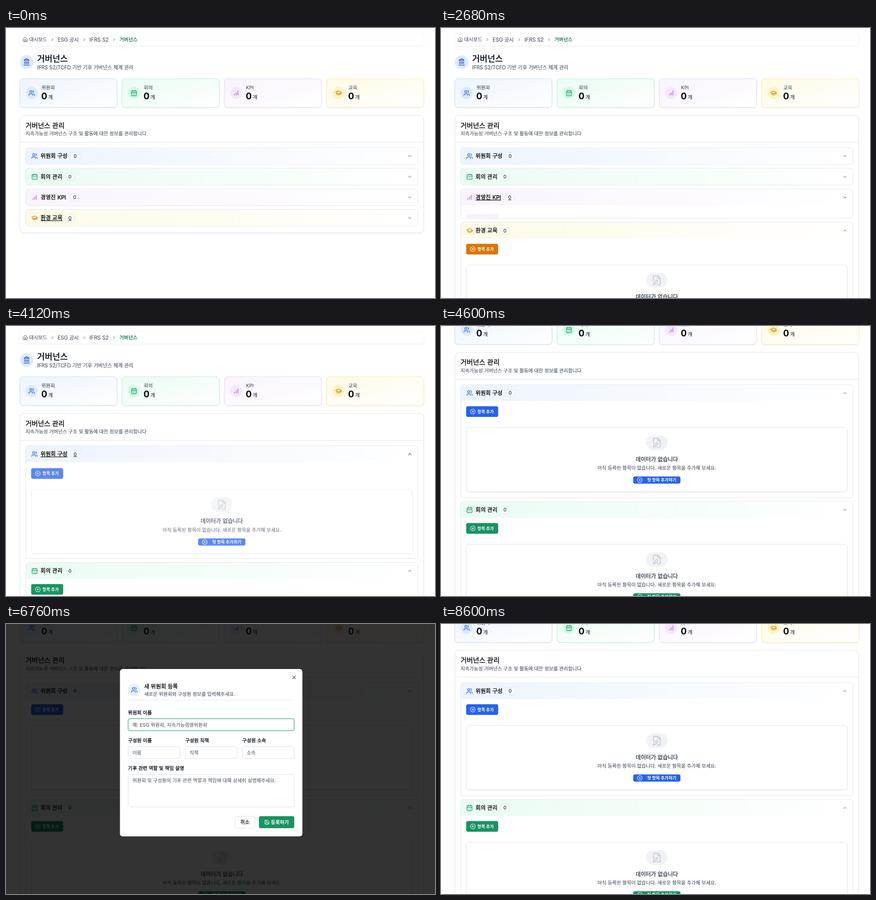
Recreate the animation shown at these times as an HTML page. Size 943 by 594 pixels, loop 8840 ms.

```html
<!DOCTYPE html>
<html lang="ko">
<head>
<meta charset="utf-8">
<title>거버넌스</title>
<style>
html, body { margin: 0; width: 100%; height: 100%; overflow: hidden; background: #fff; }
svg { display: block; width: 100%; height: 100%; }
text { font-family: Inter, "Noto Sans CJK KR", "Noto Sans CJK", "Noto Sans CJK JP", sans-serif; white-space: pre; }
.icon { fill: none; stroke-linecap: round; stroke-linejoin: round; }
.lift { filter: drop-shadow(0 1px 1px rgba(0, 0, 0, .08)); }
.under { text-decoration: underline; text-underline-offset: 2px; text-decoration-thickness: 1px; }
</style>
</head>
<body>
<svg id="stage" viewBox="0 0 943 594" xmlns="http://www.w3.org/2000/svg"></svg>
<script>
const LOOP = 8840, STEP = 40;
const ROW_TOP = 263.6, ROW_PITCH = 45.3, ROW_H = 36.5, GROW = 211.7, SCROLL = 134.4;

const ICONS = {
  users: 'M16 21v-2a4 4 0 0 0-4-4H6a4 4 0 0 0-4 4v2M5 7a4 4 0 1 0 8 0a4 4 0 1 0-8 0M22 21v-2a4 4 0 0 0-3-3.87M16 3.13a4 4 0 0 1 0 7.75',
  calendar: 'M8 2v4M16 2v4M3 10h18M5 4h14a2 2 0 0 1 2 2v14a2 2 0 0 1-2 2H5a2 2 0 0 1-2-2V6a2 2 0 0 1 2-2zM8 14h.01M12 14h.01M16 14h.01M8 18h.01M12 18h.01M16 18h.01',
  bars: 'M12 20V10M18 20V4M6 20v-4',
  cap: 'M21.42 10.92a1 1 0 0 0 0-1.84L12.83 5.18a2 2 0 0 0-1.66 0L2.6 9.08a1 1 0 0 0 0 1.83l8.57 3.91a2 2 0 0 0 1.66 0zM22 10v6M6 12.5V16a6 3 0 0 0 12 0v-3.5',
  landmark: 'M3 22h18M6 18v-7M10 18v-7M14 18v-7M18 18v-7M12 2l8 5H4z',
  home: 'M15 21v-8a1 1 0 0 0-1-1h-4a1 1 0 0 0-1 1v8M3 10a2 2 0 0 1 .7-1.5l7-6a2 2 0 0 1 2.6 0l7 6A2 2 0 0 1 21 10v9a2 2 0 0 1-2 2H5a2 2 0 0 1-2-2z',
  plus: 'M2 12a10 10 0 1 0 20 0a10 10 0 1 0-20 0M8 12h8M12 8v8',
  filePen: 'M12.5 22H18a2 2 0 0 0 2-2V7l-5-5H6a2 2 0 0 0-2 2v9.5M14 2v4a2 2 0 0 0 2 2h4M13.4 15.6a1 1 0 1 0-3-3l-5 5a2 2 0 0 0-.5.9l-.9 2.8a.5.5 0 0 0 .7.7l2.8-.9a2 2 0 0 0 .9-.5z',
  save: 'M15.2 3a2 2 0 0 1 1.4.6l3.8 3.8a2 2 0 0 1 .6 1.4V19a2 2 0 0 1-2 2H5a2 2 0 0 1-2-2V5a2 2 0 0 1 2-2zM17 21v-7a1 1 0 0 0-1-1H8a1 1 0 0 0-1 1v7M7 3v4a1 1 0 0 0 1 1h7',
  right: 'M9 18l6-6-6-6',
  down: 'M6 9l6 6 6-6',
  close: 'M18 6L6 18M6 6l12 12'
};

const THEMES = [
  { icon: 'users', color: '#2563eb', button: '#2563eb', tint: '#edf4ff', disc: '#dbeafe', edge: '#d5e3fb', card: '위원회', row: '위원회 구성', badge: 141, badgeW: 22 },
  { icon: 'calendar', color: '#1a9363', button: '#1a9363', tint: '#eafcf3', disc: '#d1fae5', edge: '#c9f2de', card: '회의', row: '회의 관리', badge: 130, badgeW: 21 },
  { icon: 'bars', color: '#a14fd0', button: '#9333ea', tint: '#f9f4ff', disc: '#f3e8ff', edge: '#e9e0fb', card: 'KPI', row: '경영진 KPI', badge: 140, badgeW: 22 },
  { icon: 'cap', color: '#d07a0c', button: '#d97706', tint: '#fffae6', disc: '#fef3c0', edge: '#fbeec0', card: '교육', row: '환경 교육', badge: 130, badgeW: 21 }
];

// y is the middle of the letters; the thin stroke gives the face its sturdier weight
function text(x, y, size, str, fill, { weight = 400, medium = false, anchor = 'start', id = '' } = {}) {
  const stroke = weight > 400 ? '' : `stroke="${fill}" stroke-width="${medium ? .38 : .15}"`;
  return `<text ${id && `id="${id}"`} x="${x}" y="${y + size * .37}" font-size="${size}" font-weight="${weight}" fill="${fill}" text-anchor="${anchor}" ${stroke}>${str}</text>`;
}
function icon(name, cx, cy, size, color, width = 2) {
  const k = size / 24;
  return `<path class="icon" d="${ICONS[name]}" transform="translate(${cx - size / 2} ${cy - size / 2}) scale(${k})" stroke="${color}" stroke-width="${width}"/>`;
}
function box(x, y, w, h, r, fill, stroke = 'none', attrs = '') {
  return `<rect x="${x}" y="${y}" width="${w}" height="${h}" rx="${r}" fill="${fill}" stroke="${stroke}" ${attrs}/>`;
}
const disc = (cx, cy, r, fill) => `<circle cx="${cx}" cy="${cy}" r="${r}" fill="${fill}"/>`;

function defs() {
  return '<defs>' + THEMES.map((th, i) => {
    const stops = `<stop stop-color="${th.tint}"/><stop offset="1" stop-color="#fff"/>`;
    return `<linearGradient id="diag${i}" x2="1" y2="1">${stops}</linearGradient>
      <linearGradient id="flat${i}">${stops}</linearGradient>
      <clipPath id="clip${i}"><rect id="mask${i}" x="43" y="36" width="863" height="0"/></clipPath>`;
  }).join('') + '</defs>';
}

function header() {
  const gray = '#4b5563';
  return box(30, 11.5, 888.5, 27.5, 6, '#fff', '#f5f5f6', 'class="lift" style="opacity:.75"') +
    icon('home', 42.3, 25.5, 12, gray) +
    text(51, 25.5, 10.7, '대시보드', gray) +
    icon('right', 102, 25.5, 11, gray) +
    text(113.5, 25.5, 11.3, 'ESG 공시', gray) +
    icon('right', 172, 25.5, 11, gray) +
    text(183.5, 25.5, 11.5, 'IFRS S2', gray) +
    icon('right', 237.5, 25.5, 11, gray) +
    text(249.5, 25.5, 10.7, '거버넌스', '#14804f', { medium: true }) +
    disc(45.3, 75, 15, '#dbeafe') + icon('landmark', 45.3, 74.5, 17, '#1d4ed8') +
    text(68.5, 67.5, 18.3, '거버넌스', '#1f2937', { weight: 700 }) +
    text(68.5, 87, 11.05, 'IFRS S2/TCFD 기반 기후 거버넌스 체계 관리', gray);
}

function card(th, i) {
  const x = 30.5 + i * 224.8;
  return box(x, 111.7, 213.5, 63, 7, `url(#diag${i})`, th.edge, 'stroke-width="1.3" class="lift"') +
    disc(x + 26, 143, 13.2, th.disc) + icon(th.icon, x + 26, 143, 14.5, th.color) +
    text(x + 47.5, 131, 10.7, th.card, '#4b5563') +
    text(x + 47, 150, 19.5, '0', '#0a0a0a', { weight: 700 }) +
    text(x + 62.5, 152.3, 10.7, '개', '#4b5563', { medium: true });
}

function row(th, i) {
  const white = { weight: 700 };
  return `<g id="row${i}">
    <rect id="frame${i}" x="43.5" y="0" width="862" rx="5" fill="#fff" stroke="#e2e5ea"/>
    ${box(44, .5, 861, 35.4, 4.5, `url(#flat${i})`)}
    ${icon(th.icon, 62.8, 18.3, 14.5, th.color)}
    <g id="label${i}">
      ${text(76, 18.3, 12.15, th.row, '#111', { medium: true })}
      ${box(th.badge + .5, 10.5, th.badgeW - 1, 15.5, 4, 'rgba(255,255,255,.35)', '#e5e9f0')}
      ${text(th.badge + th.badgeW / 2, 18.3, 10.4, '0', '#1f2937', { anchor: 'middle' })}
    </g>
    <g id="chevron${i}">${icon('down', 887.5, 18.3, 12, '#4b5563')}</g>
    <g clip-path="url(#clip${i})"><g id="body${i}">
      ${box(55.3, 47.3, 70.4, 23.5, 4, th.button, 'none', `id="add${i}"`)}
      ${icon('plus', 70, 59, 12.5, '#fff')}
      ${text(80, 59, 9.2, '항목 추가', '#fff', white)}
      ${box(55.7, 94, 837.5, 141.2, 6, '#fff', '#e2e5ea', 'class="lift"')}
      ${box(450.8, 111.6, 47.2, 32, 16, '#f1f2f4')}
      ${icon('filePen', 474.4, 127.6, 23, '#c8cdd4')}
      ${text(474.5, 163.8, 12.2, '데이터가 없습니다', '#374151', { medium: true, anchor: 'middle' })}
      ${text(474.5, 182.8, 10.6, '아직 등록된 항목이 없습니다. 새로운 항목을 추가해 보세요.', '#4b5563', { anchor: 'middle' })}
      ${box(422.5, 201.8, 103.8, 15.8, 4, th.button)}
      ${icon('plus', 437, 209.6, 12.5, '#fff')}
      ${text(453, 209.6, 9.3, '첫 항목 추가하기', '#fff', white)}
    </g></g>
  </g>`;
}

function panel() {
  return '<rect id="panel" x="30.7" y="192.4" width="887.3" rx="8" fill="#fff" stroke="#e2e5ea" class="lift"/>' +
    text(43, 214.3, 14.8, '거버넌스 관리', '#111', { medium: true }) +
    text(43, 232, 10.65, '지속가능성 거버넌스 구조 및 활동에 대한 정보를 관리합니다', '#4b5563') +
    box(31, 251, 886.5, 1, 0, '#e2e5ea') +
    THEMES.map(row).join('');
}

function field(x, y, w, h, hint, id = '') {
  return box(x, y, w, h, 4, '#fff', '#d9dde3', id && `id="${id}"`) + text(x + 9.5, y + 13.2, 10.7, hint, '#5b6370');
}

function dialog() {
  const label = (x, y, s) => text(x, y, 10.7, s, '#111827', { medium: true });
  return `<g id="dialog">
    ${box(250.5, 99, 401, 368.3, 6, '#fff')}
    ${icon('close', 633.2, 117.3, 13, '#444')}
    <g id="form">
      ${disc(282, 145, 13.5, '#e9f1ff')}${icon('users', 282, 145, 14.5, '#2563eb')}
      ${text(303.7, 137.7, 12.2, '새 위원회 등록', '#111', { medium: true })}
      ${text(303.7, 153.6, 10.6, '새로운 위원회와 구성원 정보를 입력해주세요.', '#4b5563')}
      ${box(268, 166.7, 365.5, 1, 0, '#e2e5ea')}
      ${label(268.3, 195.3, '위원회 이름')}
      ${field(268.5, 208.4, 365, 26.2, '예: ESG 위원회, 지속가능경영위원회', 'nameField')}
      <rect id="caret" x="278" y="215" width="1" height="12" fill="#111"/>
      ${['이름', '직책', '소속'].map((s, i) => label(268.3 + i * 125.6, 256.4, '구성원 ' + s) + field(268.5 + i * 125.5, 269.8, 114, 26.2, s)).join('')}
      ${label(268.3, 317.5, '기후 관련 역할 및 책임 설명')}
      ${field(268.5, 331.2, 365, 71.3, '위원회 및 구성원의 기후 관련 역할과 책임에 대해 상세히 설명해주세요.')}
      ${box(503, 423, 44.4, 26, 4, '#fff', '#d9dde3', 'id="cancel"')}
      ${text(525.2, 436, 10.8, '취소', '#333', { medium: true, anchor: 'middle', id: 'cancelText' })}
      ${box(556, 422.7, 77.6, 26.5, 4, '#1a9363')}
      ${icon('save', 573.5, 436, 12, '#fff')}
      ${text(582.3, 436, 10.7, '등록하기', '#fff', { weight: 700 })}
    </g>
  </g>`;
}

const stage = document.getElementById('stage');
stage.innerHTML = defs() + `<g id="page">${header()}${THEMES.map(card).join('')}${panel()}</g>
  <rect id="shade" width="943" height="594"/>${dialog()}`;

const parts = {};
stage.querySelectorAll('[id]').forEach(el => { parts[el.id] = el; });
const set = (id, attrs) => { for (const k in attrs) parts[id].setAttribute(k, attrs[k]); };

const span = (t, start, dur) => Math.min(1, Math.max(0, (t - start) / dur));
const easeOut = p => 1 - (1 - p) ** 2;
const easeInOut = p => p * p * (3 - 2 * p);
const mix = (a, b, p) => `rgb(${a.map((v, i) => Math.round(v + (b[i] - v) * p))})`;

const OPENED = [3905, 3265, 2665, 665];
const HOVERS = [[0, 3], [40, -1], [80, 2], [160, 1], [240, 2], [280, -1], [320, 3], [1040, 2], [3040, 1], [3760, 0], [4240, -1]];
const BLINKS = [5840, 6280, 6760, 7200, 7680, 8120];

function drawRows(t) {
  const hovered = HOVERS.filter(h => h[0] <= t).pop()[1];
  let y = ROW_TOP;
  THEMES.forEach((_, i) => {
    const open = easeOut(span(t, OPENED[i], 220));
    const shown = easeOut(span(t, OPENED[i], 420));
    const grown = GROW * open;
    set('row' + i, { transform: `translate(0 ${y})` });
    set('frame' + i, { height: ROW_H + grown });
    set('mask' + i, { height: grown });
    set('body' + i, { opacity: shown, transform: `translate(0 ${8 * (1 - shown)})` });
    set('chevron' + i, { transform: `rotate(${180 * open} 887.5 18.3)` });
    set('label' + i, { class: hovered === i ? 'under' : '' });
    y += ROW_PITCH + grown;
  });
  set('panel', { height: y - ROW_PITCH + ROW_H + 14.5 - 192.4 });
  const press = span(t, 4970, 150) - span(t, 5340, 150);
  set('add0', { fill: mix([37, 99, 235], [29, 78, 216], press) });
}

function drawDialog(t) {
  const visible = t >= 5360 && t < 8600;
  const stay = 1 - easeOut(span(t, 8440, 160));
  const amount = easeOut(span(t, 5335, 115)) * stay;
  const dim = easeOut(span(t, 5335, 145)) * stay;
  const shown = easeOut(span(t, 5330, 310));
  const focused = t < 8320;
  const blinkOn = BLINKS.filter(b => b <= t).length % 2 === 0;
  const display = visible ? 'inline' : 'none';
  const k = .95 + .05 * amount;
  set('shade', { display, opacity: .8 * dim });
  set('dialog', { display, opacity: amount, transform: `translate(451 283.2) scale(${k}) translate(-451 -283.2)` });
  set('form', { opacity: shown, transform: `translate(0 ${5 * (1 - shown)})` });
  set('nameField', { stroke: focused ? '#3fa983' : '#d9dde3', 'stroke-width': focused ? 1.3 : 1 });
  set('caret', { opacity: focused && blinkOn ? 1 : 0 });
  set('cancel', { fill: focused ? '#fff' : '#f0f2f4' });
  set('cancelText', { fill: t < 8120 ? '#333' : '#111' });
}

function draw(t) {
  set('page', { transform: `translate(0 ${-SCROLL * easeInOut(span(t, 4200, 400))})` });
  drawRows(t);
  drawDialog(t);
}

const begin = performance.now();
function tick() {
  const t = (performance.now() - begin) % LOOP;
  draw(Math.floor(t / STEP) * STEP);
  requestAnimationFrame(tick);
}
tick();
</script>
</body>
</html>
```
